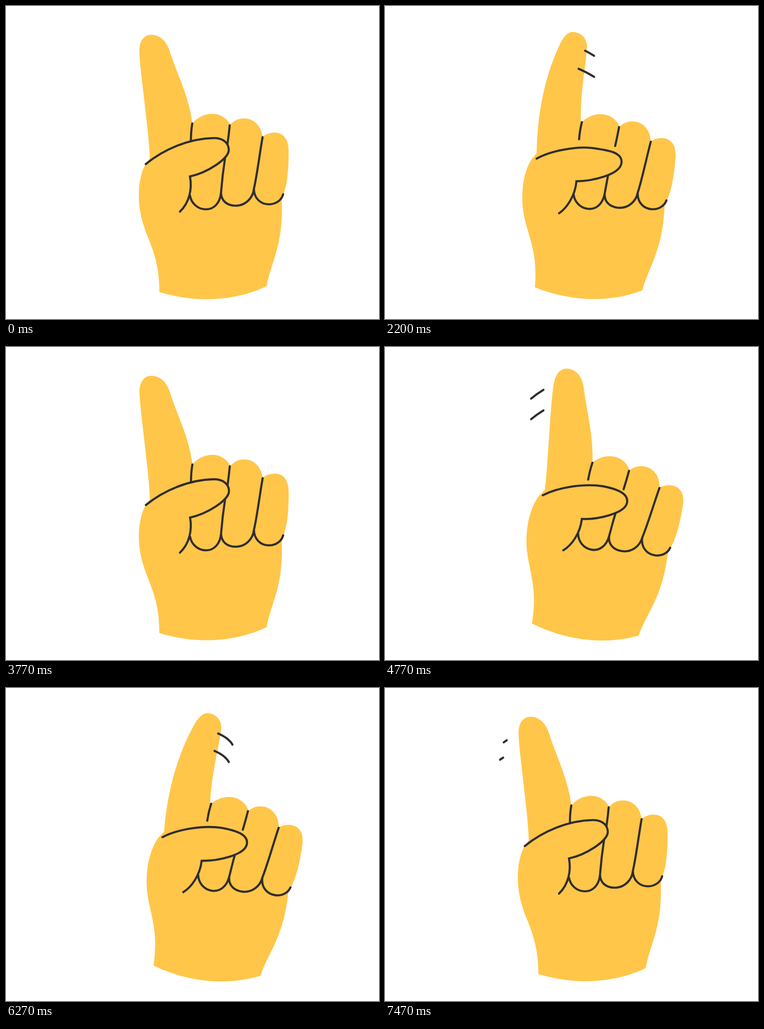
An HTML page for the animation above (7.51 s loop, 817 px wide and 685 px high).

```html
<!DOCTYPE html>
<html lang="en">
<head>
<meta charset="utf-8">
<title>Wagging finger</title>
<style>
  html, body { margin: 0; width: 100%; height: 100%; overflow: hidden; background: #fff; }
  svg { display: block; width: 100vw; height: 100vh; }
  .skin { fill: #ffc649; }
  .ink { stroke: #2f2d2c; stroke-width: 4.6; stroke-linecap: round; }
  .line { fill: none; }
</style>
</head>
<body>
<svg viewBox="0 0 817 685">
  <g id="hand">
    <path id="shape" class="skin"/>
    <path class="ink line" d="M408 257Q405 275 405 295 M490 261Q488 282 485 303 M480 331
      Q474 370 471 408 M403 415C406 432 420 445 438 445C455 445 469 432 471 408
      C471 427 485 437 503 437C525 437 541 420 543 400C543 420 557 434 576 434
      C592 434 604 424 607 412 M543 400C550 370 556 320 562 287"/>
    <path id="thumb" class="skin ink"/>
  </g>
  <g id="marks"></g>
</svg>
<script>
const LOOP = 7510, FRAMES = 225, FRAME = LOOP / FRAMES;
const GROW = 240, SHRINK = 290;
const byId = id => document.getElementById(id);
const hand = byId('hand'), shape = byId('shape'), thumb = byId('thumb');

const fingerLeft = 'M315 333C313 270 292 130 292 98C292 76 303 63 318 63C336 63 350 75 358 97C374 148 402 200 408 257';
const fingerRight = 'M315 333C309 250 318 165 345 93C352 74 361 62 373 62C392 62 406 75 405.5 97C405 148 399 205 406 257';
const fist = `L408 257C420 243 436 236 452 236C468 236 484 245 491 260C500 250 510 246 522 246
  C542 246 559 262 562 286C569 281 578 277 588 277C608 277 619 292 619 318C619 360 616 390 608 412
  L604 425C608 525 580 560 571 613C500 647 415 650 336 626C336 520 291 500 291 413C291 390 296 362 306 346Z`;
const thumbUp = 'M306 346C345 314 400 290 456 289C478 289 488 302 488 315C488 335 440 365 403 373C408 400 402 430 381 450';
const thumbDown = 'M316 345C345 325 400 311 432 311.5C470 313 502 315 502 338C502 365 440 384 407 387C407 420 390 448 375 460';

const progress = (t, from, to) => Math.max(0, Math.min(1, (t - from) / (to - from)));
const swing = (t, from, to) => (1 - Math.cos(Math.PI * progress(t, from, to))) / 2;
// Rises over the first pair of times and falls over the second.
const pulse = (t, up, top, down, end) => swing(t, up, top) - swing(t, down, end);

const turn = t => 9.6 * (pulse(t, 0, 700, 1040, 1640) + pulse(t, 1540, 2800, 2800, 3740));
const bend = t => .6 * pulse(t, 40, 400, 640, 1150) + .9 * pulse(t, 1140, 1380, 1400, 1720)
  + pulse(t, 1750, 2150, 2530, 2830) + pulse(t, 2850, 3110, 3260, 3770);
const thumbDrop = t => pulse(t, 0, 400, 600, 1700) + pulse(t, 1740, 2140, 2150, 3300);

// Each swoosh is a pair of arcs that grow from one end and vanish at the other.
function swoosh(d, [dx, dy], begin, end, lag = 0) {
  return [0, 1].map(row => {
    const path = document.createElementNS('http://www.w3.org/2000/svg', 'path');
    path.setAttribute('d', d);
    path.setAttribute('class', 'ink line');
    path.setAttribute('transform', `translate(${dx * row} ${dy * row})`);
    byId('marks').append(path);
    const length = path.getTotalLength();
    return t => {
      const time = t - lag * row;
      const tail = length * progress(time, end - SHRINK, end);
      const visible = length * progress(time, begin, begin + GROW) - tail;
      path.style.display = visible > .5 ? '' : 'none';
      path.setAttribute('stroke-dasharray', `${Math.max(0, visible)} ${length * 3}`);
      path.setAttribute('stroke-dashoffset', -tail);
    };
  });
}

const marks = [
  swoosh('M510 113Q415 34 320 113', [0, 45], 700, 1079),
  swoosh('M264 109Q361 48 458 109', [0, 46], 1765, 2205, 22),
  swoosh('M496 124C478 92 390 70 335 110', [-8, 38], 2480, 2860),
  swoosh('M470 119Q365 43 260 119', [-8, 38], 3180, 3747)
].flat();

function mix(a, b, amount) {
  const ends = b.match(/[\d.]+/g);
  let i = 0;
  return a.replace(/[\d.]+/g, n => (+n + (ends[i++] - n) * amount).toFixed(2));
}

function draw(time) {
  const t = Math.floor((time % LOOP + 7) / FRAME) % FRAMES * FRAME;
  // The wag plays twice per loop, with a short pause before the first one.
  const phase = t < 3770 ? Math.max(0, t - 30) : t - 3740;
  hand.setAttribute('transform', `rotate(${turn(phase)} 453.5 531)`);
  shape.setAttribute('d', mix(fingerLeft, fingerRight, bend(phase)) + fist);
  thumb.setAttribute('d', mix(thumbUp, thumbDown, thumbDrop(phase)));
  marks.forEach(update => update(phase));
}

const start = performance.now();
function tick() {
  draw(performance.now() - start);
  requestAnimationFrame(tick);
}
tick();
</script>
</body>
</html>
```
